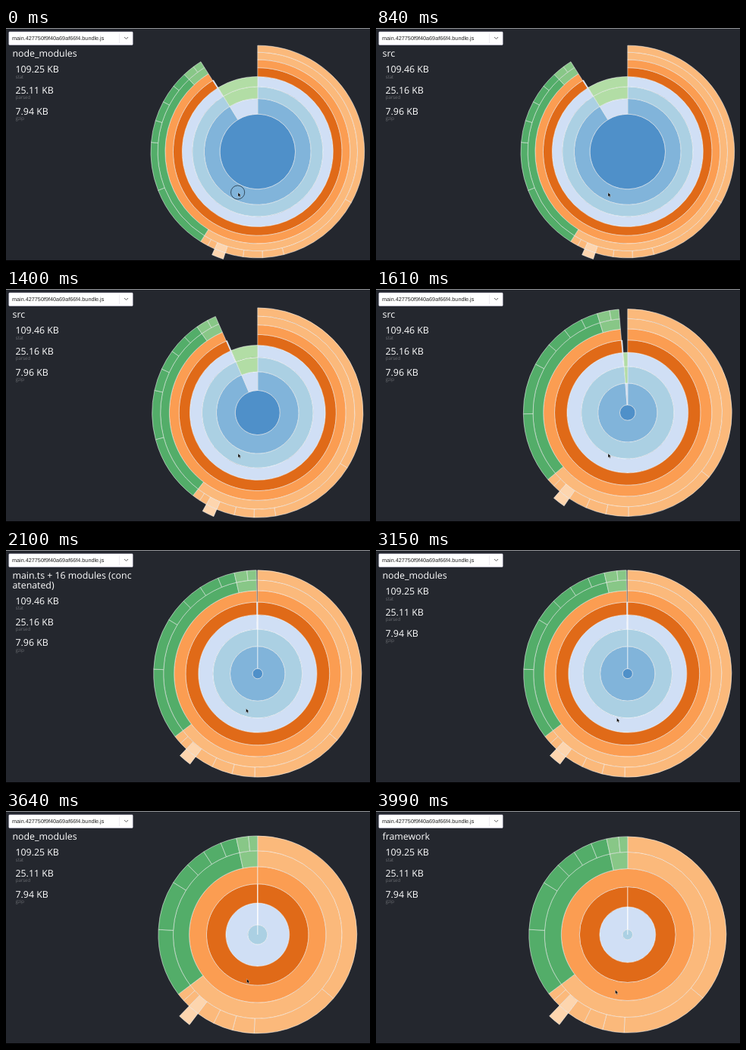
An HTML page that plays this animation: 480 px wide and 309 px high, repeating every 4.2 s.

```html
<!DOCTYPE html>
<html lang="en">
<head>
<meta charset="utf-8">
<title>Bundle sunburst</title>
<style>
  html, body { margin: 0; width: 100%; height: 100%; overflow: hidden; background: #24272e; }
  svg { display: block; width: 480px; height: 309px; }
  text { text-rendering: geometricPrecision; font-family: "Open Sans", "Noto Sans", sans-serif; fill: #fff; font-size: 12.35px; }
  .label { font-size: 6.2px; font-weight: 300; fill: #8d8f93; }
  .file { font: 7.25px "Liberation Sans", Arial, sans-serif; fill: #222; }
</style>
</head>
<body>
<svg viewBox="0 0 480 309">
  <rect width="480" height="309" fill="#24272e"/>
  <rect width="480" height=".7" fill="#c4c4c6"/>
  <rect y="308" width="480" height="1" fill="#000"/>
  <rect x="3.8" y="5" width="163.4" height="17.5" rx="1" fill="#fff" stroke="#d5d3ea" stroke-width=".5"/>
  <path d="M149.5 7.5V20" stroke="#e4e0ea" stroke-width=".6"/>
  <path d="M156 12l2.5 2.6l2.5-2.6" fill="none" stroke="#555" stroke-width=".9"/>
  <text class="file" x="8" y="16.3">main.427750f9f40a69af66f4.bundle.js</text>
  <text id="title1" x="8.5" y="38.3"></text>
  <text id="title2" x="8.5" y="51"></text>
  <g id="stats"></g>
  <g id="chart" transform="translate(331.8 164)" stroke="#fff" stroke-width=".5" fill-rule="evenodd"></g>
  <circle id="ring" cx="305.6" cy="218" r="9.1" fill="none" stroke="#1d2b38" stroke-width=".75"/>
  <path id="cursor" d="M0 0V5.4L1.3 4.3L2.2 6.2L3.2 5.7L2.3 3.9H4Z" fill="#000" stroke="#fff" stroke-width=".35"/>
</svg>
<script>
const LOOP = 4200, RADIUS = 149.4, HOLE = 6.8, DEPTHS = 9, TAU = 2 * Math.PI;
const ZOOM_MS = 780;
const SRC = 0.9125, MODULES = SRC * 0.9981;
const color = {
  root: '#4f90c9', blue: '#81b4da', teal: '#abd0e3', pale: '#d0dff5',
  rust: '#e06a18', orange: '#fb9d52', peach: '#fbb97b', cream: '#fdd5ae',
  green: '#53ad69', leaf: '#88c787', mint: '#b2dda5'
};
const $ = id => document.getElementById(id);
const make = (tag, parent) =>
  parent.appendChild(document.createElementNS('http://www.w3.org/2000/svg', tag));

// Nodes hold a depth and a start/end share of the whole bundle.
const nodes = [];
function add(depth, start, end, fill) {
  const path = make('path', $('chart'));
  path.setAttribute('fill', fill);
  nodes.push({ depth, start, end, path });
}
function addCells(depth, degrees, fill) {
  for (let i = 1; i < degrees.length; i++)
    add(depth, degrees[i - 1] / 360 * MODULES, degrees[i] / 360 * MODULES, fill);
}

add(0, 0, 1, color.root);
add(1, 0, SRC, color.blue);
add(1, SRC, 1, color.pale);
add(2, 0, SRC, color.teal);
add(2, SRC, 1, color.mint);
add(3, 0, MODULES, color.pale);
add(3, MODULES, SRC, color.pale);
add(3, SRC, 1, color.mint);
add(4, 0, MODULES, color.rust);
add(4, MODULES, SRC, color.pale);
add(5, 0, MODULES, color.orange);
addCells(6, [0, 233], color.peach);
addCells(6, [233, 347.7], color.green);
addCells(6, [347.7, 360], color.leaf);
addCells(7, [0, 130.3, 182, 194.7, 206.3, 217], color.peach);
addCells(7, [217, 223.7], color.cream);
addCells(7, [223.7, 228.2, 233], color.peach);
addCells(7, [233, 273, 302, 315.2, 327.2, 338.3, 347.7], color.green);
addCells(7, [347.7, 354.8, 360], color.leaf);
addCells(8, [217, 223.7], color.cream);

const clamp = (v, lo, hi) => Math.min(hi, Math.max(lo, v));
const mix = (a, b, k) => a + (b - a) * k;
const cubicInOut = p => p < 0.5 ? 4 * p ** 3 : 1 - 4 * (1 - p) ** 3;
const progress = (t, start, length) => cubicInOut(clamp((t - start) / length, 0, 1));

function arcPath(a0, a1, r0, r1) {
  const at = (a, r) => `${(r * Math.sin(a)).toFixed(3)} ${(-r * Math.cos(a)).toFixed(3)}`;
  const ringPath = r => r > 0
    ? `M0 ${-r}A${r} ${r} 0 1 1 0 ${r}A${r} ${r} 0 1 1 0 ${-r}Z` : '';
  if (r1 <= 0) return '';
  if (a1 - a0 > TAU - 1e-6) return ringPath(r1) + ringPath(r0);
  const large = a1 - a0 > Math.PI ? 1 : 0;
  return `M${at(a0, r1)}A${r1} ${r1} 0 ${large} 1 ${at(a1, r1)}L${at(a1, r0)}` +
    (r0 > 0 ? `A${r0} ${r0} 0 ${large} 0 ${at(a0, r0)}` : '') + 'Z';
}

function drawChart(t) {
  const first = progress(t, 1075, ZOOM_MS), second = progress(t, 3089, ZOOM_MS);
  const span = mix(mix(1, SRC, first), MODULES, second);
  const base = Math.sqrt((first + 2 * second) / DEPTHS);
  const inner = HOLE * first;
  const angle = x => clamp(x / span, 0, 1) * TAU;
  const radius = depth => Math.max(0,
    inner + (RADIUS - inner) * (Math.sqrt(depth / DEPTHS) - base) / (1 - base));
  for (const n of nodes)
    n.path.setAttribute('d', arcPath(angle(n.start), angle(n.end), radius(n.depth), radius(n.depth + 1)));
}

const statTexts = ['stat', 'parsed', 'gzip'].map((name, i) => {
  const value = make('text', $('stats')), label = make('text', $('stats'));
  value.setAttribute('x', 12.5);
  value.setAttribute('y', 59.2 + 27.8 * i);
  label.setAttribute('x', 12.8);
  label.setAttribute('y', 66.6 + 27.8 * i);
  label.setAttribute('class', 'label');
  label.textContent = name;
  return value;
});

const small = ['109.25 KB', '25.11 KB', '7.94 KB'];
const full = ['109.46 KB', '25.16 KB', '7.96 KB'];
const hovers = [
  { from: 0, lines: ['node_modules'], sizes: small },
  { from: 140, lines: ['src'], sizes: full },
  { from: 1960, lines: ['main.ts + 16 modules (conc', 'atenated)'], sizes: full },
  { from: 2730, lines: ['node_modules'], sizes: small },
  { from: 3850, lines: ['framework'], sizes: small }
];
let shown;
function drawInfo(t) {
  const hover = hovers.filter(h => h.from <= t).pop();
  if (hover === shown) return;
  shown = hover;
  $('title1').textContent = hover.lines[0];
  $('title2').textContent = hover.lines[1] || '';
  $('stats').setAttribute('transform', `translate(0 ${hover.lines[1] ? 12.7 : 0})`);
  statTexts.forEach((text, i) => { text.textContent = hover.sizes[i]; });
}

const moves = [
  { start: 1820, length: 280, dx: 10.5, dy: -8 },
  { start: 2520, length: 350, dx: 1, dy: 12.5 },
  { start: 3640, length: 350, dx: -2, dy: 14.5 }
];
function drawCursor(t) {
  let x = 306, y = 218.3;
  for (const m of moves) {
    const k = progress(t, m.start, m.length);
    x += m.dx * k;
    y += m.dy * k;
  }
  $('cursor').setAttribute('transform', `translate(${x} ${y})`);
  $('ring').setAttribute('visibility', t < 280 ? 'visible' : 'hidden');
}

function draw(t) {
  drawChart(t);
  drawInfo(t);
  drawCursor(t);
}

const origin = performance.now();
function tick(now) {
  draw(Math.max(0, now - origin) % LOOP);
  requestAnimationFrame(tick);
}
draw(0);
requestAnimationFrame(tick);
</script>
</body>
</html>
```
